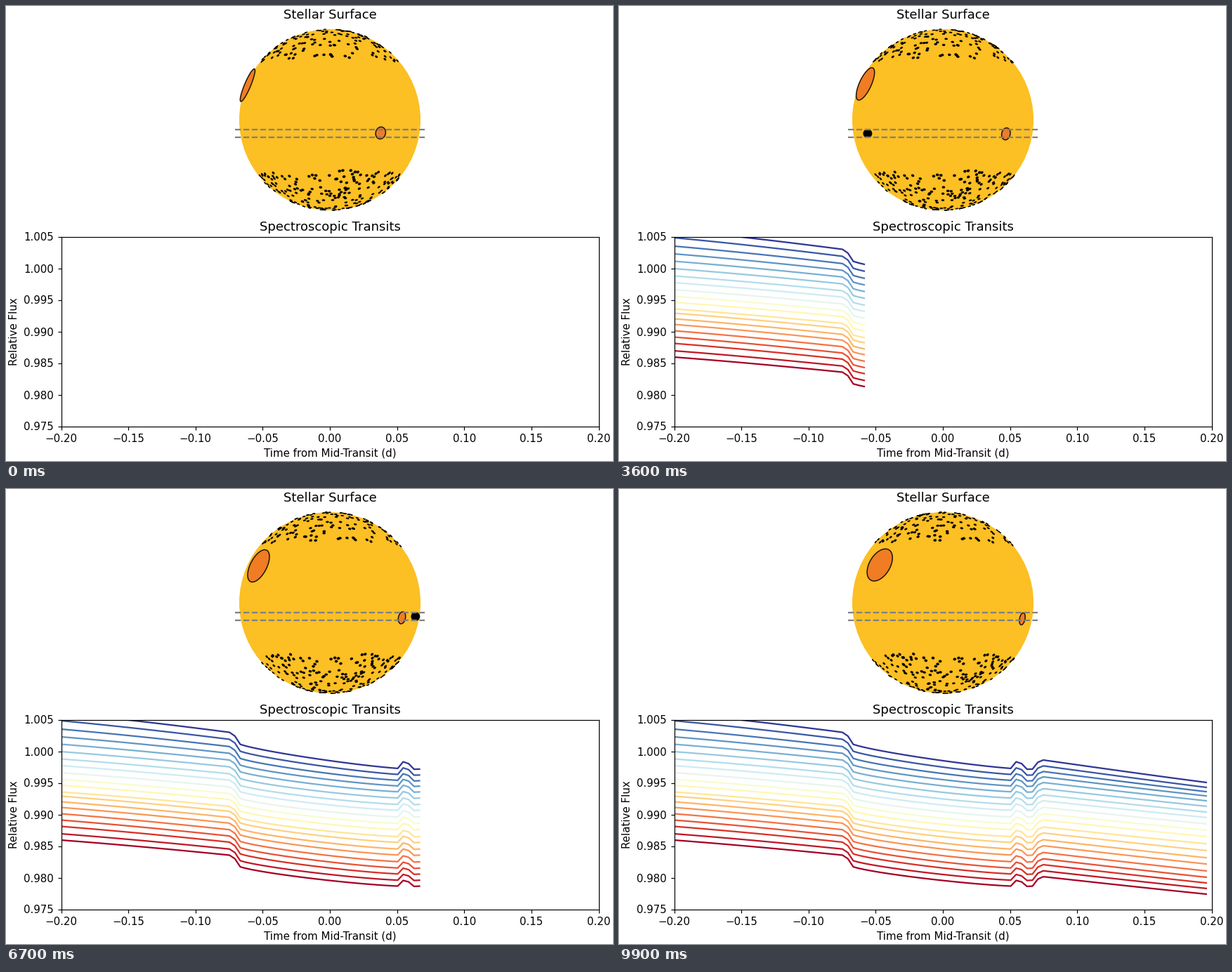
Recreate the animation shown at these times as a matplotlib script. Size 864 px wide and 648 px high, loop 10000 ms.

```python
import numpy as np
import matplotlib.pyplot as plt
from matplotlib.animation import FuncAnimation
from matplotlib.collections import PolyCollection
from matplotlib.patches import Circle

W, H, DPI = 864, 648, 108
FRAMES = 100
R = 129                       # stellar radius in pixels
HALF = 134.6                  # half side of the star panel in pixels
TILT = np.radians(5)
SPIN = np.radians(28.8) / (FRAMES - 1)
RP, IMPACT = 0.044, -0.152    # planet radius and path height
STEP = 7.387 / R              # planet motion per frame

fig = plt.figure(figsize=(W / DPI, H / DPI), dpi=DPI, facecolor="white")


def panel(x0, top, x1, bottom):
    return fig.add_axes([x0 / W, 1 - bottom / H, (x1 - x0) / W, (bottom - top) / H])


def project(lat, lon):
    """Sky x, y and depth of points on the tilted sphere."""
    x = np.cos(lat) * np.sin(lon)
    z = np.cos(lat) * np.cos(lon)
    y = np.sin(lat)
    c, s = np.cos(TILT), np.sin(TILT)
    return x, y * c + z * s, z * c - y * s


def outlines(lat, lon, radius, n=32):
    """Foreshortened ellipses of the visible spots."""
    x, y, mu = project(lat, lon)
    seen = mu > 0
    x, y, mu, a = (v[seen, None] for v in (x, y, mu, radius))
    rho = np.hypot(x, y) + 1e-9
    ang = np.linspace(0, 2 * np.pi, n, endpoint=False)
    along, across = a * np.cos(ang), a * mu * np.sin(ang)
    return np.stack([x + (across * x - along * y) / rho,
                     y + (across * y + along * x) / rho], axis=-1)


# Stellar surface
sky = panel(461 - HALF, 162 - HALF, 461 + HALF, 162 + HALF)
sky.set(xlim=(-HALF / R, HALF / R), ylim=(-HALF / R, HALF / R))
sky.axis("off")
sky.set_title("Stellar Surface")
sky.add_patch(Circle((0, 0), 1, fc="#fcbf24", ec="none", zorder=0))

rng = np.random.default_rng(12)
N = 330
dot_lat = np.arcsin(rng.uniform(np.sin(np.radians(38.3)), 1, 2 * N))
dot_lat[N:] *= -1
dot_lon = rng.uniform(-np.pi, np.pi, 2 * N)
dot_rad = np.full(2 * N, 0.013)

spot_lat = np.radians([21.4, -12.5])
spot_lon = np.radians([-77.2, 35.0])
spot_rad = np.array([0.195, 0.067])

dots = PolyCollection([], fc="black", ec="black", lw=0.9, alpha=0.9, zorder=1)
spots = PolyCollection([], fc="#f07c24", ec="#1c1206", lw=1, zorder=1.1)
planet = Circle((-9, IMPACT), RP, fc="black", ec="black", lw=1, zorder=1.5)
sky.add_collection(dots, autolim=False)
sky.add_collection(spots, autolim=False)
sky.add_patch(planet)
for side in (-RP, RP):
    sky.axhline(IMPACT + side, color="gray", ls="--", lw=1.5)

# Light curves: start level above 0.98 and total fade, both in 1e-4
START = [260.6, 248.3, 235, 222.8, 211.1, 199.4, 187.8, 177.2, 166.1, 155.6,
         146.1, 135.6, 128.9, 120, 111.1, 101.1, 91.1, 81.1, 69.4, 59.4]
FADE = [110, 105.5, 99, 93.5, 89.5, 86.5, 84, 82, 81, 80.5,
        81, 82, 86, 88.5, 89.5, 90.5, 90.5, 89.5, 86.5, 85.5]

time = np.linspace(-0.2, 0.2, FRAMES)
step = np.arange(FRAMES)


def fade_shape():
    u = time + 0.2
    return u * (220 + 160 * (u - 0.125) - 410 * (u - 0.125) * (u - 0.2746)) / 99


def transit():
    """Depth of the limb-darkened transit, and the share hidden by the spot."""
    x = STEP * (step - (FRAMES - 1) / 2)
    rho = np.hypot(x, IMPACT)
    d = np.clip((rho - 1) / RP, -1, 1)
    inside = (np.arccos(d) - d * np.sqrt(1 - d * d)) / np.pi
    mu = np.sqrt(np.clip(1 - rho ** 2, 0.0225, 1))
    depth = 0.002356 * inside * (1 - 0.4 * (1 - mu))
    gap = np.abs(x - project(spot_lat[1], spot_lon[1] + SPIN * step)[0])
    cross = np.where(gap < 0.052, 1 - (gap / 0.1) ** 2, 0)
    return depth, cross


plot = panel(78.5, 328.5, 843.5, 598.5)
plot.set(xlim=(-0.2, 0.2), ylim=(0.975, 1.005), title="Spectroscopic Transits",
         xlabel="Time from Mid-Transit (d)", ylabel="Relative Flux")

shape = fade_shape()
depth, cross = transit()
contrast = np.linspace(0.56, 0.47, len(START))
colors = plt.cm.RdYlBu(np.linspace(1, 0, len(START)))
fluxes, lines = [], []
for start, fade, k, color in zip(START, FADE, contrast, colors):
    fluxes.append(0.98 + 1e-4 * (start - fade * shape) - depth * (1 - k * cross))
    lines += plot.plot([], [], color=color, lw=1.5)


def update(i):
    turn = SPIN * i
    dots.set_verts(outlines(dot_lat, dot_lon + turn, dot_rad, 16))
    spots.set_verts(outlines(spot_lat, spot_lon + turn, spot_rad, 64))
    planet.center = (STEP * (i - (FRAMES + 1) / 2), IMPACT)
    for line, flux in zip(lines, fluxes):
        line.set_data(time[:i], flux[:i])
    return [dots, spots, planet, *lines]


anim = FuncAnimation(fig, update, frames=FRAMES, interval=100,
                     repeat=True, repeat_delay=0, blit=False)
plt.show()
```
